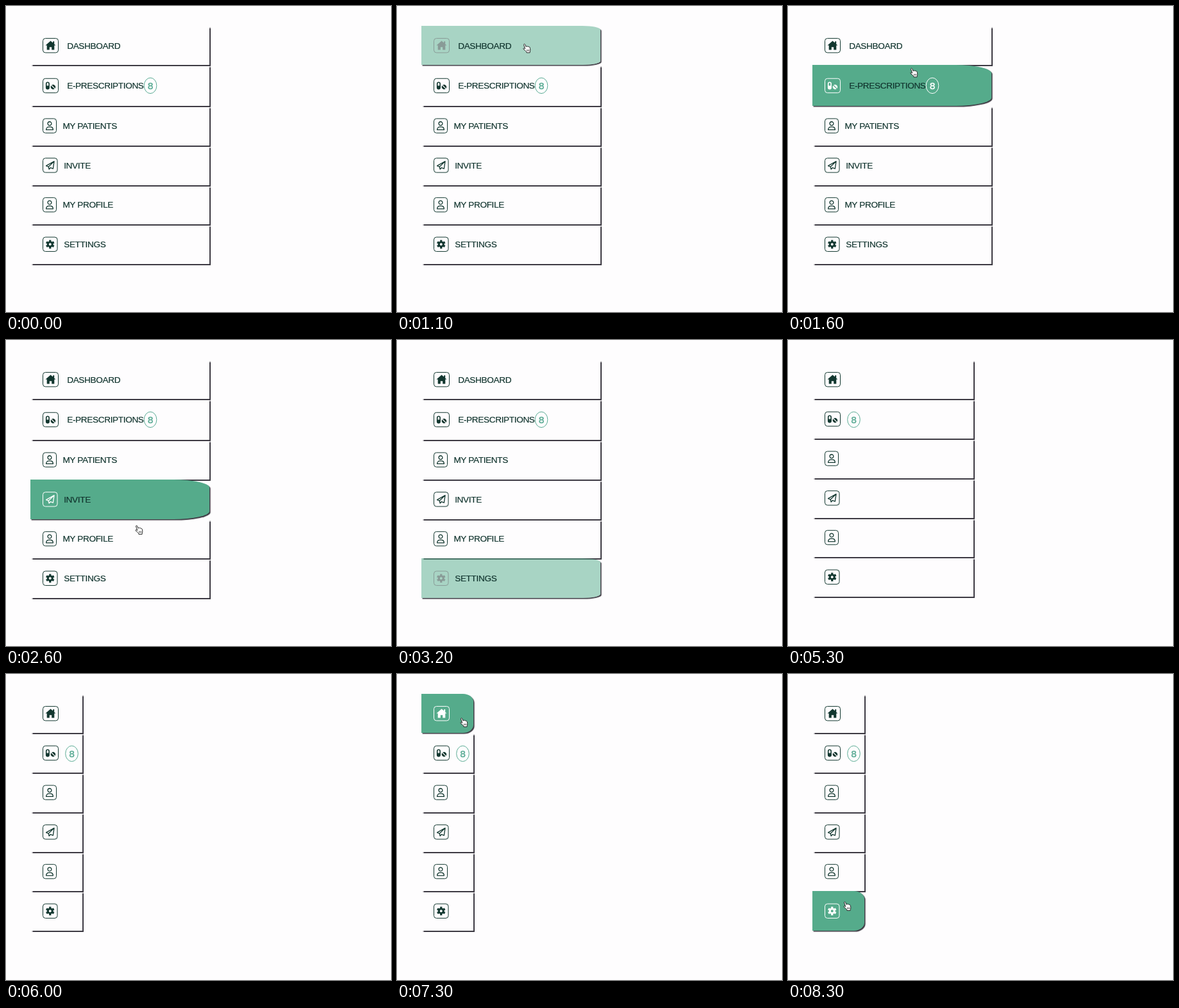
Write an HTML page that moves like this. It is 600x478 px and loops after 8.7 s.

```html
<!DOCTYPE html>
<html lang="en">
<head>
<meta charset="utf-8">
<title>Sidebar menu</title>
<style>
  html, body { margin: 0; width: 100%; height: 100%; overflow: hidden; background: #fefdfe; }
  .row {
    position: absolute; left: 38px;
    --r: calc(var(--w) * .2);
    border-radius: 0 var(--r) var(--r) 0;
    background: color-mix(in srgb, #55ab8b var(--w), transparent);
    box-shadow: 1.6px 1.6px 1px #3d3a43;
  }
  svg { position: absolute; left: 0; top: 0; }
  .item { --c: color-mix(in srgb, #fff var(--w), #12372f); }
  .icon { fill: var(--c); }
  .line { fill: none; stroke: var(--c); stroke-width: 1.3; stroke-linejoin: round; }
  .frame { fill: none; stroke: var(--c); }
  .label {
    font: 13.6px "Liberation Sans", Arial, sans-serif; letter-spacing: -.35px;
    fill: #12352f; stroke: #12352f; stroke-width: .2;
  }
  .badge { --b: color-mix(in srgb, #fff var(--w), #5aab94); }
  .badge ellipse { fill: none; stroke: var(--b); }
  .badge text {
    font: 14.5px "DejaVu Sans", sans-serif; text-anchor: middle;
    fill: var(--b); stroke: var(--b); stroke-width: .4;
  }
</style>
</head>
<body>
<svg id="art" width="600" height="478">
  <g id="items"></g>
  <path id="arrow" d="M0 0V12.5L2.9 9.8 4.8 14 6.8 13.1 5 9H9Z" fill="#111" stroke="#fff" stroke-width=".8"/>
  <g id="hand" stroke="#222" stroke-linejoin="round">
    <path fill="#fff" d="M0 1C0-.3 1.6-.6 2.1.6L3.6 4.2 4 3.6C4.6 3 5.6 3.2 5.8 4 6.4 3.3 7.4 3.5 7.7 4.4 8.5 4 9.3 4.4 9.6 5.4 10.2 7.5 10.6 9.5 9.8 11.6L9.6 13.4H4.4L4.2 12C2.8 10.8 1.2 9-.6 7.6-.9 6.7 0 6.2 1 6.6L2.2 7.4Z"/>
    <path fill="none" stroke-width=".7" d="M5 8.6v2.6M6.6 8.6v2.6M8.2 8.6v2.6"/>
  </g>
</svg>
<script>
const LOOP = 8700, STEP = 100, SHRINK = 4500, FOLD = 5300;
const LEFT = 38, TOP = 30.7, PITCH = 61.7;

const user = `<g class="line"><circle cy="-3.5" r="2.9"/>
  <path d="M-5.4 6.3C-5.4 3.4-3.5 1.8-1.2 1.8H1.2C3.5 1.8 5.4 3.4 5.4 6.3Z"/></g>`;
const house = `<path class="icon" d="M0-7.3L3.6-4.2V-6.4H5.7V-2.3L8-.3H5.8V6.8H1.7V2.4H-1.7V6.8H-5.8V-.3H-8Z"/>`;
const pills = `<g class="icon">
  <path fill-rule="evenodd" d="M-7.6-3a3 3 0 0 1 6 0v6a3 3 0 0 1-6 0ZM-6-3v3h2.8v-3a1.4 1.4 0 0 0-2.8 0Z"/>
  <path transform="translate(3.9 2) rotate(45)" d="M-3.8-.6A3.9 3.9 0 0 1 3.8-.6ZM-3.8.6A3.9 3.9 0 0 0 3.8.6Z"/></g>`;
const plane = `<path class="line" d="M6.3-6.2L-6.2.8-2.6 2.4-1.6 6.2.6 3.7 4.6 5.3ZL-2.6 2.4"/>`;
const gear = `<g class="line"><circle r="3.5" style="stroke-width:3"/>
  <circle r="5.6" pathLength="12" stroke-dasharray="1.1 .9" stroke-dashoffset="-.45" style="stroke-width:2.4"/></g>`;

// label, label x, icon frame width, icon
const menu = [
  ["DASHBOARD", 95.2, 24, house],
  ["E-PRESCRIPTIONS", 95.2, 24, pills],
  ["MY PATIENTS", 88.4, 21, user],
  ["INVITE", 90.2, 22.5, plane],
  ["MY PROFILE", 88.4, 21, user],
  ["SETTINGS", 90.2, 22.5, gear],
];

// pointer path: time, x, y
const path = [
  [500, 252.5, 241.5], [700, 197.5, 59.5], [1100, 197.5, 59.5], [1350, 193, 93], [1600, 191.5, 97.5],
  [1700, 193, 158], [2600, 202.5, 290], [2800, 207, 342], [3200, 207, 342],
  [6900, 179, 52], [7100, 112, 64], [7300, 99.5, 69], [8100, 90, 346], [8300, 87.5, 356],
];

const $ = id => document.getElementById(id);
const isOpen = t => t < FOLD;

function pointer(t) {
  const n = path.findIndex(k => k[0] > t);
  if (n <= 0) return path.at(n).slice(1);
  const [t0, x0, y0] = path[n - 1], [t1, x1, y1] = path[n];
  const p = (t - t0) / (t1 - t0);
  return [x0 + (x1 - x0) * p, y0 + (y1 - y0) * p];
}

function rightEdge(t) {
  if (isOpen(t)) return 317 - 4 * Math.min(6, Math.max(0, (t - SHRINK) / 100));
  return 119 + 85 * (1 + Math.cos(Math.PI * Math.min(1, (t - FOLD) / 700)));
}

// the badge makes its row taller while the labels show
const rowTop = (i, t) => TOP + PITCH * i + (isOpen(t) && i > 1 ? 2 : 0);

function rowUnder(t) {
  const active = t >= 1000 && t < 3100 || t >= 6800;
  const [x, y] = pointer(t);
  if (!active || x > rightEdge(t)) return -1;
  return menu.findIndex((_, i) => y >= rowTop(i, t) && y < rowTop(i + 1, t));
}

$("items").innerHTML = menu.map(([label, x, w, icon], i) => `<g class="item">
  <g class="body"><rect class="frame" x="57.5" y="-11.2" width="${w}" height="22.4" rx="4"/>
  <g transform="translate(${57.5 + w / 2} 0)">${icon}</g>
  <text class="label" x="${x}" y="4.9">${label}</text></g>
  ${i == 1 ? '<g class="badge" id="badge"><ellipse rx="9.8" ry="12.2"/><text y="5.6">8</text></g>' : ""}</g>`).join("");

const items = [...document.querySelectorAll(".item")];
const rows = menu.map(() => {
  const row = document.createElement("div");
  row.className = "row";
  document.body.insertBefore(row, $("art"));
  return row;
});

function draw(t) {
  const open = isOpen(t), width = rightEdge(t) - LEFT;
  // the highlight trails the pointer and fades over two steps
  const recent = [rowUnder(t - 100), rowUnder(t - 200)];

  rows.forEach((row, i) => {
    const top = Math.round(rowTop(i, t)), bottom = Math.round(rowTop(i + 1, t));
    const w = 50 * recent.filter(r => r == i).length + "%";
    row.style.top = top + "px";
    row.style.height = bottom - top + "px";
    row.style.width = width + "px";
    row.style.setProperty("--w", w);
    items[i].style.setProperty("--w", w);
    const body = items[i].querySelector(".body");
    const y = (rowTop(i, t) + rowTop(i + 1, t)) / 2 + .2;
    body.setAttribute("transform", `translate(0 ${y})`);
    body.lastElementChild.style.display = open ? "" : "none";
  });
  $("badge").setAttribute("transform", `translate(${open ? 225 : 102.5} 124.4)`);

  const shown = t >= 400 && t < 3200 || t >= 6900;
  const cursor = recent[0] < 0 ? "arrow" : "hand";
  for (const id of ["arrow", "hand"]) {
    $(id).setAttribute("transform", `translate(${pointer(t)})`);
    $(id).style.display = shown && id == cursor ? "" : "none";
  }
}

const start = performance.now();
function tick() {
  const t = (performance.now() - start) % LOOP;
  draw(Math.floor(t / STEP) * STEP);
  requestAnimationFrame(tick);
}
tick();
</script>
</body>
</html>
```
